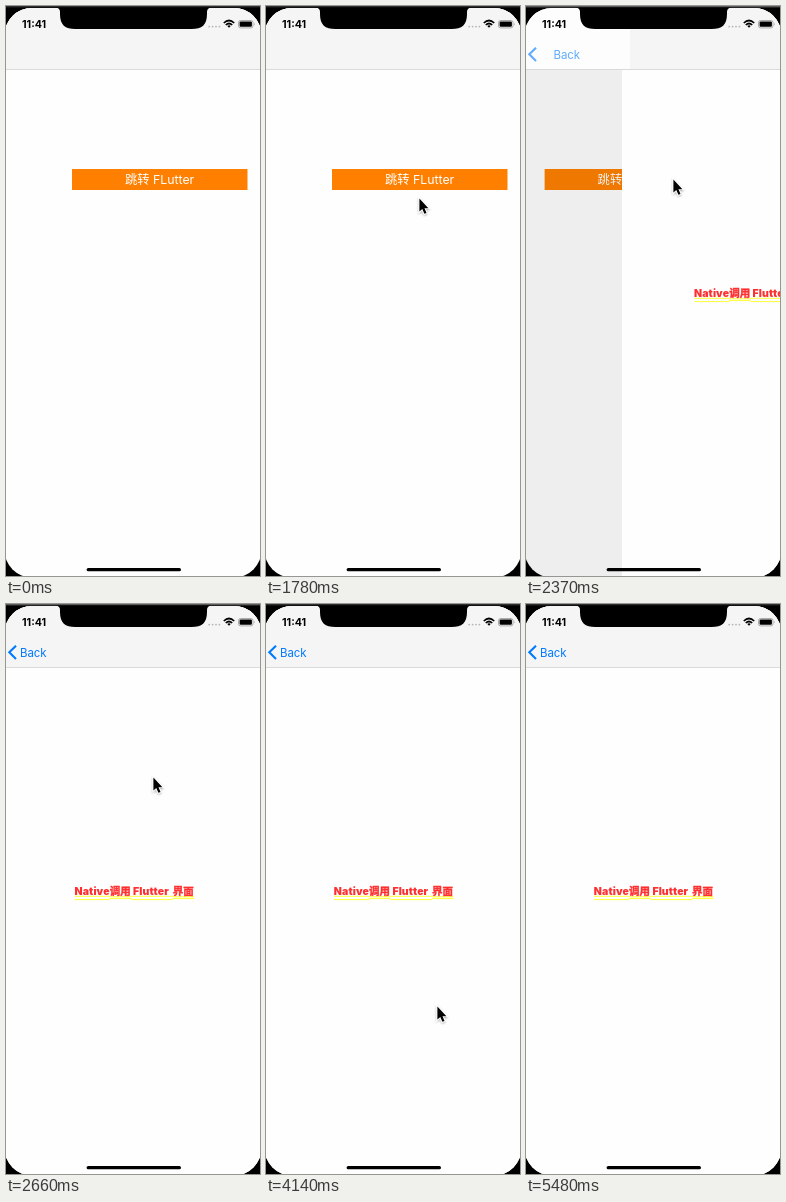
Write an HTML page that moves like this. It is 254 px wide and 570 px high and loops after 5630 ms.

```html
<!DOCTYPE html>
<html lang="zh">
<head>
<meta charset="utf-8">
<style>
html, body { margin: 0; width: 100%; height: 100%; overflow: hidden; background: #000; }
svg { display: block; width: 254px; height: 570px; font-family: Inter, "Noto Sans CJK SC", "Noto Sans CJK", sans-serif; }
#label { font-size: 10.5px; font-weight: 900; fill: #ff3030; letter-spacing: .12px; }
#label .han { letter-spacing: 0; stroke: #ff3030; stroke-width: .4; }
#label path { stroke: #ff0; fill: none; stroke-width: .8; }
</style>
</head>
<body>
<svg viewBox="0 0 254 570">
  <defs>
    <clipPath id="screen"><rect x="-1.5" y="2" width="257" height="569.5" rx="27.5"/></clipPath>
    <filter id="shadow" x="-50%" y="-50%" width="200%" height="200%">
      <feDropShadow dx="0" dy="1" stdDeviation=".8" flood-opacity=".35"/>
    </filter>
  </defs>
  <rect width="254" height="570"/>
  <rect id="strip" width="254" height="1.4"/>
  <g clip-path="url(#screen)">
    <rect width="254" height="570" fill="#fefefe"/>
    <g id="first">
      <rect x="66" y="163" width="175.5" height="21" fill="#ff8000"/>
      <text x="153.6" y="178.3" font-size="12.3" text-anchor="middle" fill="#fff">跳转 FLutter</text>
    </g>
    <rect id="dim" width="254" height="570"/>
    <rect id="second" y="63" width="254" height="507" fill="#fefefe"/>
    <g id="label">
      <text x="67.8" y="290.5">Native</text>
      <text class="han" x="103" y="290.8">调用</text>
      <text x="126.4" y="290.5">Flutter</text>
      <text class="han" x="166" y="290.8">界面</text>
      <path d="M68 292.3h35M68 295.6h35M124.5 292.3h41.5M124.5 295.6h41.5"/>
      <path d="M103 292.8h21.5M103 294.6h21.5M166 292.8h21.5M166 294.6h21.5"/>
    </g>
    <rect width="254" height="63" fill="#fdfdfd"/>
    <rect id="bar" width="254" height="63" fill="#f5f5f5"/>
    <path d="M0 63.5H254" stroke="#dadada"/>
    <g id="back" fill="#007aff">
      <path d="M10 41.7L3.3 48.3L10 54.9" fill="none" stroke="#007aff" stroke-width="2.1"/>
      <text id="backText" x="14" y="52.7" font-size="11.5" letter-spacing="-.1">Back</text>
    </g>
  </g>
  <path d="M50 1.5Q54 2 54 6V8C54 19 59 23 69.5 23H185.5C196 23 201 19 201 8V6Q201 2 205 1.5Z"/>
  <text x="16" y="22" font-size="10.7" font-weight="700">11:41</text>
  <g fill="#b5b5b5">
    <circle cx="203.2" cy="20.6" r=".9"/><circle cx="206.6" cy="20.6" r=".9"/>
    <circle cx="210" cy="20.6" r=".9"/><circle cx="213.4" cy="20.6" r=".9"/>
  </g>
  <g fill="none" stroke="#000" stroke-width="1.7">
    <path d="M217.8 17Q223 12 228.2 17M219.8 19Q223 16 226.2 19"/>
    <path d="M221.3 19.9Q223 18.7 224.7 19.9L223 21.8Z" fill="#000" stroke="none"/>
  </g>
  <rect x="232.5" y="14.5" width="14.5" height="7.4" rx="2" fill="none" stroke="#999" stroke-width=".8"/>
  <rect x="233.6" y="15.6" width="12.3" height="5.2" rx="1"/>
  <path d="M248 16.8q1.3 1.4 0 2.8z" fill="#999"/>
  <rect x="80.6" y="562" width="94.4" height="3.3" rx="1.65"/>
  <g id="cursor" filter="url(#shadow)">
    <path d="M.4 .6V13.6L3.3 11L5.4 15.8L7.5 14.9L5.5 10.2H9.4Z"
      stroke="#fff" stroke-width="1.6" paint-order="stroke"/>
  </g>
</svg>
<script>
const LOOP = 5630, STEP = 148, PUSH = 2265;
const $ = id => document.getElementById(id);
const set = (id, name, value) => $(id).setAttribute(name, value);
const shift = (id, x, y = 0) => set(id, 'transform', `translate(${x} ${y})`);

// Pointer waypoints: step, x, y
const track = [
  [3, -4, 258], [7, 147, 203], [8, 147, 203], [12, 153, 192], [15, 147, 173],
  [19, 147, 173], [24, 196, 519], [28, 171, 402], [32, 21, 45], [36, 218, 556]
];

function pointer(k) {
  const i = Math.max(1, track.findIndex(p => p[0] >= k));
  const [a, ax, ay] = track[i - 1], [b, bx, by] = track[i];
  const u = (k - a) / (b - a), e = u * u * (3 - 2 * u);
  return [ax + (bx - ax) * e, ay + (by - ay) * e];
}

// Critically damped spring used by the page push
function spring(ms) {
  const w = Math.max(0, ms) * .0205;
  return 1 - (1 + w) * Math.exp(-w);
}

function draw(now) {
  const k = Math.min(37, Math.floor((now % LOOP + 12) / STEP));
  const time = k * STEP, pushing = time >= PUSH;
  const p = spring(time - PUSH), left = 1 - p;

  shift('first', -76 * p);
  set('dim', 'opacity', .1 * p);
  shift('second', Math.floor(255.5 * left));
  shift('label', 266 * left);
  shift('bar', pushing ? Math.floor(277 * left) : 0);
  set('back', 'opacity', p);
  shift('backText', 36 * left);
  set('strip', 'fill', k >= 15 && k < 26 ? '#5a5a5a' : '#2e2e2e');

  const shown = k >= 3 && k <= 36;
  set('cursor', 'visibility', shown ? 'visible' : 'hidden');
  if (shown) shift('cursor', ...pointer(k));
}

const start = performance.now();
function tick() {
  draw(performance.now() - start);
  requestAnimationFrame(tick);
}
tick();
</script>
</body>
</html>
```
